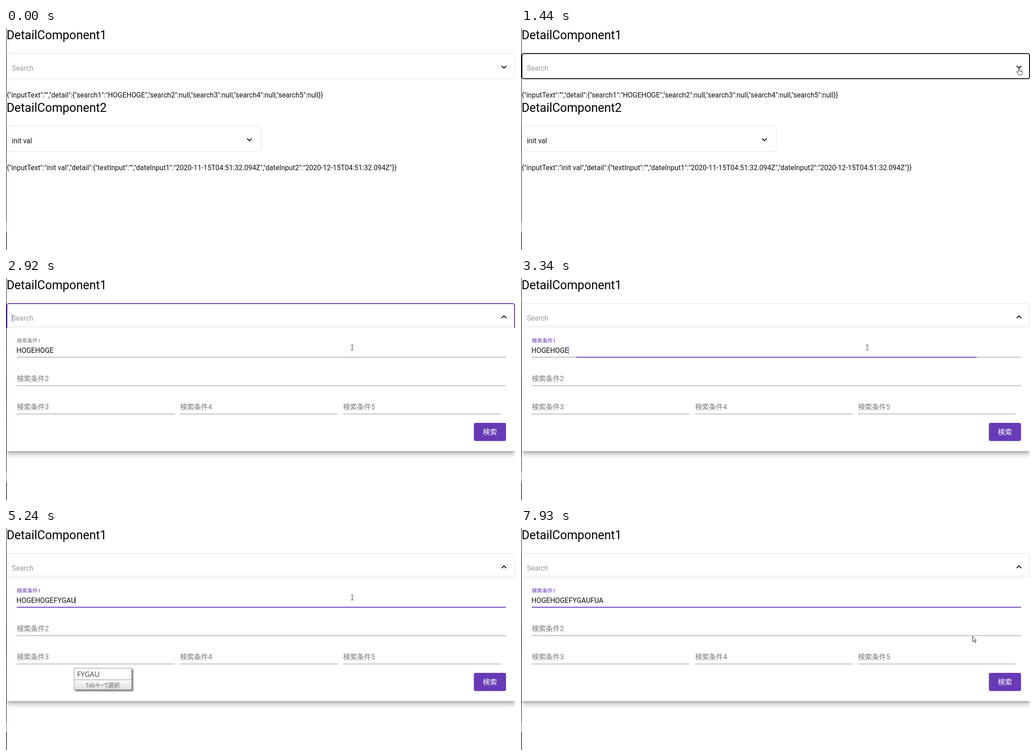
Animation, 1132 px wide and 495 px high, one loop 8000 ms. Source, as an HTML page:

```html
<!DOCTYPE html>
<html lang="ja">
<head>
<meta charset="utf-8">
<title>Detail components</title>
<style>
  html, body { margin: 0; width: 100%; height: 100%; overflow: hidden; background: #fff; }
  #stage { position: relative; width: 1132px; height: 495px; overflow: hidden; }
  svg { position: absolute; left: 0; top: 0; }
  text { font: 15.6px Roboto, "Noto Sans CJK JP", "Noto Sans CJK", sans-serif; fill: #111; white-space: pre; }
  .title { font-size: 26.85px; fill: #000; }
  .hint { fill: #999; }
  .label { fill: #7a7a7a; }
  .small { font-size: 11.7px; }
  .box { fill: none; stroke: #e2e2e2; }
  .line { fill: #868686; }
  .accent { fill: #673ab7; }
  .button { fill: #fff; font-weight: 500; text-anchor: middle; }
  #panel {
    position: absolute; left: 2px; top: 110.5px; width: 1130px; height: 275.5px; background: #fff;
    border-radius: 0 0 4px 4px;
    box-shadow: 0 5px 5px -3px rgba(0,0,0,.2), 0 8px 10px 1px rgba(0,0,0,.14), 0 3px 14px 2px rgba(0,0,0,.12);
  }
  #popup rect { stroke: #8c8c8c; }
  #popup text { font-family: "Open Sans", "Noto Sans CJK JP", "Noto Sans CJK", sans-serif; fill: #444; }
  #typed { font-size: 16px; }
  #popup .tip { font-size: 13px; fill: #666; }
  .kana { font-size: 11px; letter-spacing: -1.3px; }
  .pointer { fill: #fff; stroke: #222; stroke-linejoin: round; }
</style>
</head>
<body>
<div id="stage">
  <svg width="1132" height="495">
    <defs>
      <path id="more" d="M16.59 8.59 12 13.17 7.41 8.59 6 10l6 6 6-6z"/>
      <path id="less" d="M12 8l-6 6 1.41 1.41L12 10.83l4.59 4.58L18 14z"/>
      <linearGradient id="bar" x2="0" y2="1">
        <stop stop-color="#fbfbfb"/><stop offset="1" stop-color="#dedede"/>
      </linearGradient>
    </defs>
    <text class="title" x="1.2" y="25">DetailComponent1</text>
    <rect id="outline" class="box" rx="4.5"/>
    <text class="hint" x="13" y="95">Search</text>
    <use id="chevron" transform="translate(1095.9 75.3) scale(.97)"/>
    <text x="1.5" y="154.5">{"inputText":"","detail":{"search1":"HOGEHOGE","search2":null,"search3":null,"search4":null,"search5":null}}</text>
    <text class="title" x="1.2" y="187">DetailComponent2</text>
    <rect class="box" x="1.5" y="218.5" width="566" height="57" rx="4.5"/>
    <text x="13" y="257">init val</text>
    <use href="#more" transform="translate(529.7 237.3) scale(.97)"/>
    <text x="1.5" y="316.5">{"inputText":"init val","detail":{"textInput":"","dateInput1":"2020-11-15T04:51:32.094Z","dateInput2":"2020-12-15T04:51:32.094Z"}}</text>
  </svg>

  <div id="panel"></div>

  <svg width="1132" height="495">
    <g id="form">
      <text id="label" class="label small" x="24" y="143.5">検索条件1</text>
      <text id="value" x="23.3" y="167"></text>
      <rect class="line" x="24" y="176" width="1088" height="1"/>
      <rect id="ripple" class="accent" y="175.7" height="2"/>
      <text class="label" x="24" y="230">検索条件2</text>
      <rect class="line" x="24" y="239.5" width="1088" height="1"/>
      <text class="label" x="24" y="293">検索条件3</text>
      <rect class="line" x="24" y="302.7" width="351" height="1"/>
      <text class="label" x="387" y="293">検索条件4</text>
      <rect class="line" x="387" y="302.7" width="351" height="1"/>
      <text class="label" x="749.5" y="293">検索条件5</text>
      <rect class="line" x="749.5" y="302.7" width="351" height="1"/>
      <rect class="accent" x="1040.5" y="323" width="71.5" height="40.5" rx="4"/>
      <text class="button" x="1076.2" y="348.5">検索</text>
    </g>
    <rect id="caret" class="accent" width="1" height="17"/>
    <g id="popup">
      <g style="filter: drop-shadow(3px 3px 1.5px rgba(0,0,0,.5))">
        <rect x="151.5" y="312.5" width="128" height="48" fill="#fff"/>
      </g>
      <rect x="151.5" y="338.5" width="128" height="22" fill="url(#bar)"/>
      <text id="typed" x="158" y="332"></text>
      <text class="tip" x="177" y="354.5">Tab<tspan class="kana">キーで</tspan>選択</text>
    </g>
    <g id="pointer">
      <path id="arrow" class="pointer" d="M.5.5v12.2l2.8-2.6 2 4.5 2-.9-2-4.3h3.5z"/>
      <path id="beam" fill="none" stroke="#333" d="M-3-5.5h2.5L0-5 .5-5.5H3M0-5V5M-3 5.5h2.5L0 5l.5.5H3"/>
      <path id="hand" class="pointer" d="M-1.5 8V1.2Q-1.5 0-.4 0T.8 1.2V5q2-.8 2.4.6 1.9-.6 2.2.7 1.9-.2 1.9 1.4v3q0 1.5-1 2.6v1.4H-1.6v-1.2L-5.5 8.8q-.7-1.5.5-1.9 1.2-.1 3.5 2.6M3.2 5.6V8M5.4 6.3v2"/>
    </g>
  </svg>

  <svg width="2" height="495">
    <rect width="1" height="432" fill="#000"/>
    <rect y="432" width="1" height="23" fill="#6c6c70"/>
    <rect y="455" width="1.4" height="40" fill="#15131a"/>
  </svg>
</div>
<script>
  const LOOP = 8000, OPEN = 1840, FOCUS = 3170, CONFIRM = 6020;
  const $ = id => document.getElementById(id);
  const show = (id, on) => { $(id).style.display = on ? '' : 'none'; };
  const set = (id, attrs) => { for (const k in attrs) $(id).setAttribute(k, attrs[k]); };

  const keys = 'FYGAUFUA';
  const keyTimes = [4060, 4280, 4840, 4930, 5240, 5320, 5470, 5620];

  // Caret visibility flips at each of these times.
  const blinks = [OPEN, 2370, 2890, 3730, 4060, 4760, 4840, 6520, 7050, 7630];

  // Each stroke is a list of [time, x, y]; the pointer rests between strokes.
  const strokes = [
    [[430, 1092, 337], [660, 1086, 210], [890, 1102, 112], [1210, 1109, 96]],
    [[1290, 1107.5, 89.5]],
    [[2190, 1100, 86], [2430, 975, 80], [2680, 838, 118], [2840, 776, 152], [2920, 770, 155]],
    [[6750, 786, 190], [6930, 850, 318], [7150, 960, 341], [7480, 1059, 344]],
    [[7860, 1035, 298], [7930, 1004, 241]]
  ];

  function pointerAt(t) {
    const stroke = strokes.filter(s => s[0][0] <= t).pop();
    if (!stroke) return null;
    const start = stroke[0][0], end = stroke[stroke.length - 1][0];
    const steps = Math.max(1, Math.round((end - start) / 80));
    const tick = (end - start) / steps || 1;
    const time = Math.min(end, start + Math.floor((t - start) / tick + 1e-6) * tick);
    const i = stroke.findIndex(p => p[0] >= time - 1e-6);
    if (i < 1) return stroke[0].slice(1);
    const [t0, x0, y0] = stroke[i - 1], [t1, x1, y1] = stroke[i];
    const f = (time - t0) / (t1 - t0);
    return [x0 + (x1 - x0) * f, y0 + (y1 - y0) * f];
  }

  function pointerShape(x, y, open) {
    if (y > 56 && y < 113) return x > 1095 ? 'hand' : 'beam';
    if (open && x > 1040 && y > 323) return 'hand';
    if (open && y > 130 && y < 177) return 'beam';
    return 'arrow';
  }

  function draw(t) {
    const open = t >= OPEN, focused = t >= FOCUS;
    const typed = keys.slice(0, keyTimes.filter(k => k <= t).length);
    const pos = pointerAt(t);

    const active = open && !focused;
    const hover = !open && pos && pos[1] > 56 && pos[1] < 113;
    const weight = active || hover ? 2 : 1;
    set('outline', { x: 1 + weight / 2, y: 56 + weight / 2, width: 1131 - weight, height: 58 - weight });
    $('outline').style.stroke = active ? '#673ab7' : hover ? '#111' : '';
    $('outline').style.strokeWidth = weight;
    set('chevron', { href: open ? '#less' : '#more' });

    show('panel', open);
    show('form', open);
    $('value').textContent = 'HOGEHOGE' + typed;
    $('label').style.fill = focused ? '#673ab7' : '';
    const spread = focused ? Math.min(1, .3 + (t - FOCUS) / 330) : 0;
    set('ripple', { x: 568 - 544 * spread, width: 1088 * spread });

    show('caret', blinks.filter(b => b <= t).length % 2);
    if (focused) set('caret', { x: Math.floor(23.3 + $('value').getComputedTextLength()), y: 153 });
    else set('caret', { x: 13, y: 81 });

    show('popup', typed && t < CONFIRM);
    $('typed').textContent = typed;

    show('pointer', pos);
    if (pos) {
      const shape = pointerShape(...pos, open);
      for (const id of ['arrow', 'beam', 'hand']) show(id, id === shape);
      set('pointer', { transform: `translate(${pos.map(Math.round)})` });
    }
  }

  const origin = performance.now();
  function frame() {
    draw((performance.now() - origin) % LOOP);
    requestAnimationFrame(frame);
  }
  frame();
</script>
</body>
</html>
```
